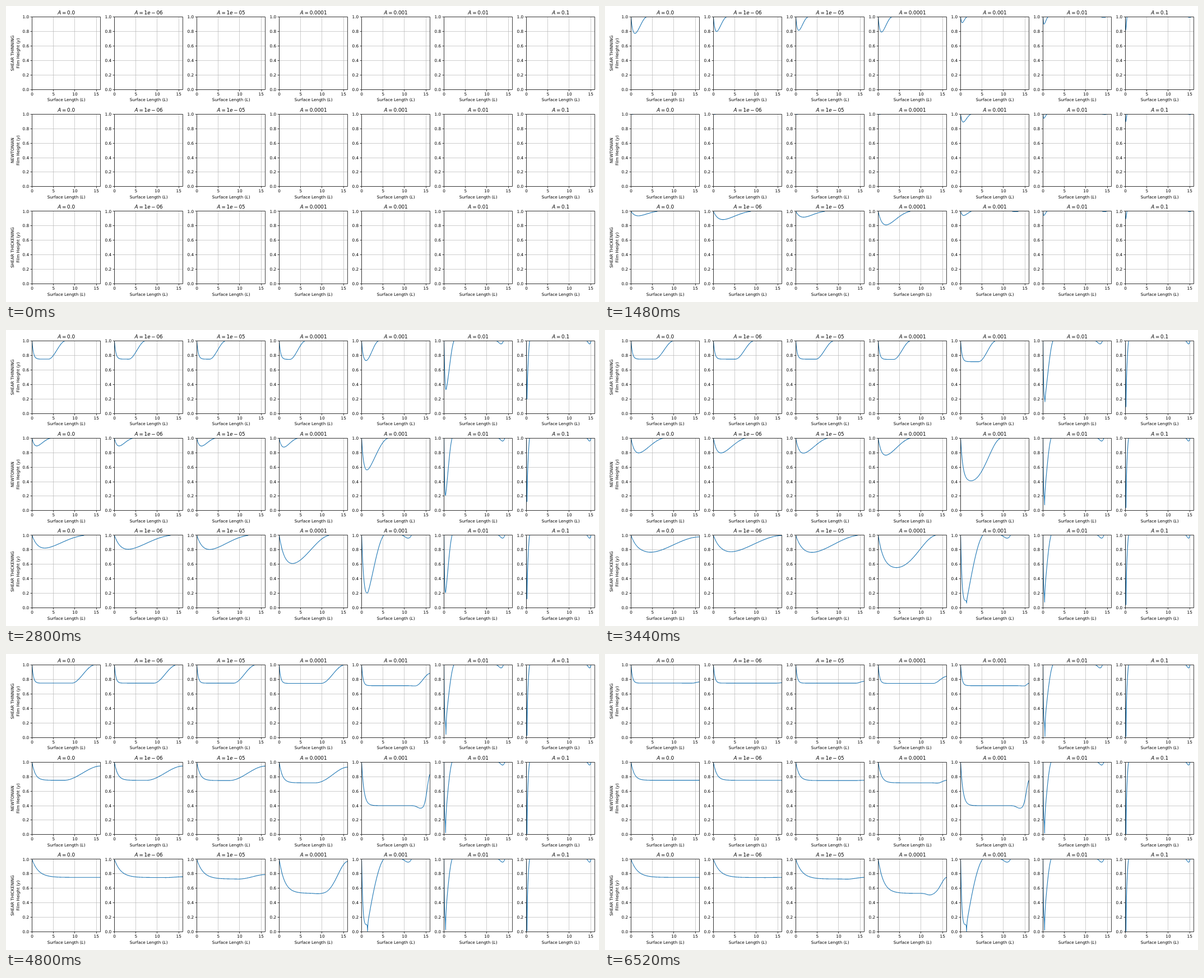
An HTML page for the animation above (6680 ms loop, 1058 by 529 pixels).

```html
<!DOCTYPE html>
<html lang="en">
<head>
<meta charset="utf-8">
<title>Film height</title>
<style>
  html, body { margin: 0; width: 100%; height: 100%; overflow: hidden; background: #fff; }
  svg { display: block; width: 1058px; height: 529px; font: 7.35px "DejaVu Sans", sans-serif; }
  .grid { fill: none; stroke: #b0b0b0; stroke-width: .62; }
  .axis { fill: none; stroke: #000; stroke-width: .75; }
  .curve { fill: none; stroke: #1f77b4; stroke-width: 1.1; stroke-linejoin: round; }
  .title { font-size: 8.82px; }
  .mid { text-anchor: middle; }
  .end { text-anchor: end; }
  .it { font-style: italic; }
</style>
</head>
<body>
<svg id="stage" viewBox="0 0 1058 529"></svg>
<script>
const LOOP = 6680, STEP = 40, LAST = 6520;
const W = 122.3, H = 129.5, LENGTH = 16, OUTLET = .25;

const clamp = (v, lo = 0, hi = 1) => Math.min(hi, Math.max(lo, v));
const smooth = u => (u = clamp(u), u * u * (3 - 2 * u));

const FLUIDS = [
  { name: 'SHEAR THINNING', decay: .33, gain: 35, width: 2.4, spread: .2, tail: 1.2, rate: 4.6 },
  { name: 'NEWTONIAN', decay: .75, gain: 350, width: 5, spread: .33, tail: 2.2, rate: 6.5 },
  { name: 'SHEAR THICKENING', decay: 1.5, gain: 2200, width: 11, spread: .2, tail: 4, rate: 6.5 }
];

// A film that thins to a plateau behind a front travelling to the outlet.
// reach: front position at 4.8 s; power: its growth; surge: a late extra push.
const drain = (reach, power, surge = 0, when = 0) => (fluid, A) => {
  const extra = fluid.gain * A, depth = OUTLET + extra;
  const decay = fluid.decay * (1 - .8 * extra);
  const rest = extra / depth;
  return t => {
    const stop = reach * (t / 4.8) ** power + surge * smooth((t - when) / .65);
    const width = (fluid.width + fluid.spread * stop) * (1 - 2 * extra * smooth((stop - 12) / 5));
    const start = Math.min(stop - width, LENGTH - fluid.tail);
    const edge = Math.min(stop, LENGTH);
    const rise = Math.max(rest, smooth((LENGTH - stop + width) / width) ** 1.5);
    const sharp = 1 + 4 * extra * smooth((stop - 6) / 8);
    const dip = .1 * extra * clamp((start - 8) / 4);
    return x => 1 - dip * Math.exp(-((x - start) ** 2))
      - depth * (1 - Math.exp(-x / decay)) * (1 - rise * smooth((x - start) / (edge - start)) ** sharp);
  };
};

// A film that pinches off near the inlet, with a faint dip near the outlet.
// reach: where the film is whole again; ratio: pinch place; body: film left beside the pinch.
const rupture = (reach, ratio, body, half) => fluid => t => {
  const low = 1 / (1 + (t / half) ** fluid.rate);
  const stop = reach * smooth(t / 3) + .01, place = ratio * stop;
  const base = Math.max(low, body);
  const steep = 5 - 3 * clamp(low / .3), bend = Math.min(1.6, .95 + 1.5 * low);
  const grown = clamp((t - 1.3) / 1.5);
  const dipLength = 1.17 * reach ** .4;
  const dipStart = 15.7 - .7 * reach - dipLength + .4 * reach * (1 - grown);
  return x => {
    if (x > stop) {
      const u = clamp((x - dipStart) / dipLength);
      return 1 - .04 * grown * Math.sin(Math.PI * u ** 1.7);
    }
    const shape = x < place
      ? (1 - x / place) ** steep
      : 1.03 * Math.sin(Math.PI / 2 * (x - place) / (stop - place)) ** bend;
    return base + (1 - base) * shape - (base - low) * Math.exp(-Math.abs(x - place) / .06);
  };
};

const slow = drain(18.7, 2.6);
const wide = rupture(2.15, .17, .22, 2.28);
const narrow = rupture(.85, .17, .4, 2.06);
const FILMS = [
  [drain(14.6, 1.17), drain(14.5, 1.3), drain(13.7, 1.32), drain(10.5, 1, 4.7, 4.15), drain(9, 1.5, 9, 3.2),
    rupture(2.6, .17, .22, 2.4), narrow],
  [slow, slow, slow, slow, drain(13.5, 1.4, 3.4, 3.2), wide, narrow],
  [drain(22, 1, 20, 3.3), drain(19, .6, 10, 3.3), drain(20, .85, 5, 4.15), drain(17, .65),
    rupture(5.8, .24, .1, 2.27), wide, narrow]
];
const strength = col => col ? 10 ** (col - 7) : 0;

function curvePath(height) {
  const n = 420;
  let d = '';
  for (let i = 0; i <= n; i++) {
    const x = LENGTH * (i / n) ** 2;
    let h = height(x);
    if (i && h > .998) h = 1.03;
    d += (i ? 'L' : 'M') + (x / LENGTH * W).toFixed(2) + ' ' + ((1 - h) * H).toFixed(2);
  }
  return d;
}

const text = (cls, x, y, body, extra = '') => `<text class="${cls}" x="${x}" y="${y}" ${extra}>${body}</text>`;
const it = s => `<tspan class="it">${s}</tspan>`;
const gap = s => `<tspan dx=".2em">${s}</tspan>`;

function valueLabel(col) {
  if (col === 0) return gap('0.0');
  if (col < 3) return gap('1') + it('e') + gap('−') + gap('0' + (7 - col));
  return gap(strength(col).toFixed(7 - col));
}

function panel(row, col) {
  const left = 46.5 + 147 * col, top = 19.7 + 173.6 * row;
  const crispX = x => Math.floor(left + x) + .5 - left;
  const crispY = y => Math.floor(top + y) + .5 - top;
  const x0 = crispX(0), x1 = crispX(W), y0 = crispY(0), y1 = crispY(H);
  let grid = '', ticks = '', labels = '';
  for (let v = 0; v < LENGTH; v += 5) {
    const at = v / LENGTH * W, x = crispX(at);
    grid += `M${x} ${y0}V${y1}`;
    ticks += `M${x} ${y1}v2.9`;
    labels += text('mid', at, H + 10.6, v);
  }
  for (let k = 0; k <= 5; k++) {
    const at = (1 - k / 5) * H, y = crispY(at);
    grid += `M${x0} ${y}H${x1}`;
    ticks += `M${x0} ${y}h-2.9`;
    labels += text('end', -5.3, at + 2.6, (k / 5).toFixed(1));
  }
  labels += text('mid', W / 2, H + 21.2, `Surface Length (${it('L')})`);
  labels += text('mid title', W / 2, -4.6, it('A') + gap('=') + valueLabel(col));
  if (col === 0) {
    const turned = x => `transform="translate(${x - left} ${H / 2}) rotate(-90)"`;
    labels += text('mid', 0, 0, FLUIDS[row].name, turned(14.2));
    labels += text('mid', 0, 0, `Film Height (${it('y')})`, turned(23.5));
  }
  return `<g transform="translate(${left} ${top})">
    <path class="grid" d="${grid}"/>
    <path class="curve" clip-path="url(#plot)"/>
    <path class="axis" d="M${x0} ${y0}H${x1}V${y1}H${x0}Z${ticks}"/>${labels}</g>`;
}

const stage = document.getElementById('stage');
stage.innerHTML = `<clipPath id="plot"><rect width="${W}" height="${H}"/></clipPath>`
  + FILMS.map((films, r) => films.map((_, c) => panel(r, c)).join('')).join('');

const paths = stage.querySelectorAll('.curve');
const films = FILMS.flatMap((row, r) => row.map((film, c) => film(FLUIDS[r], strength(c))));

let shown = -1;
const began = performance.now();
function draw() {
  const elapsed = Math.max(0, performance.now() - began) % LOOP;
  const t = Math.min(LAST, Math.floor(elapsed / STEP) * STEP);
  if (t !== shown) {
    shown = t;
    films.forEach((film, i) => paths[i].setAttribute('d', curvePath(film(t / 1000))));
  }
  requestAnimationFrame(draw);
}
draw();
</script>
</body>
</html>
```
